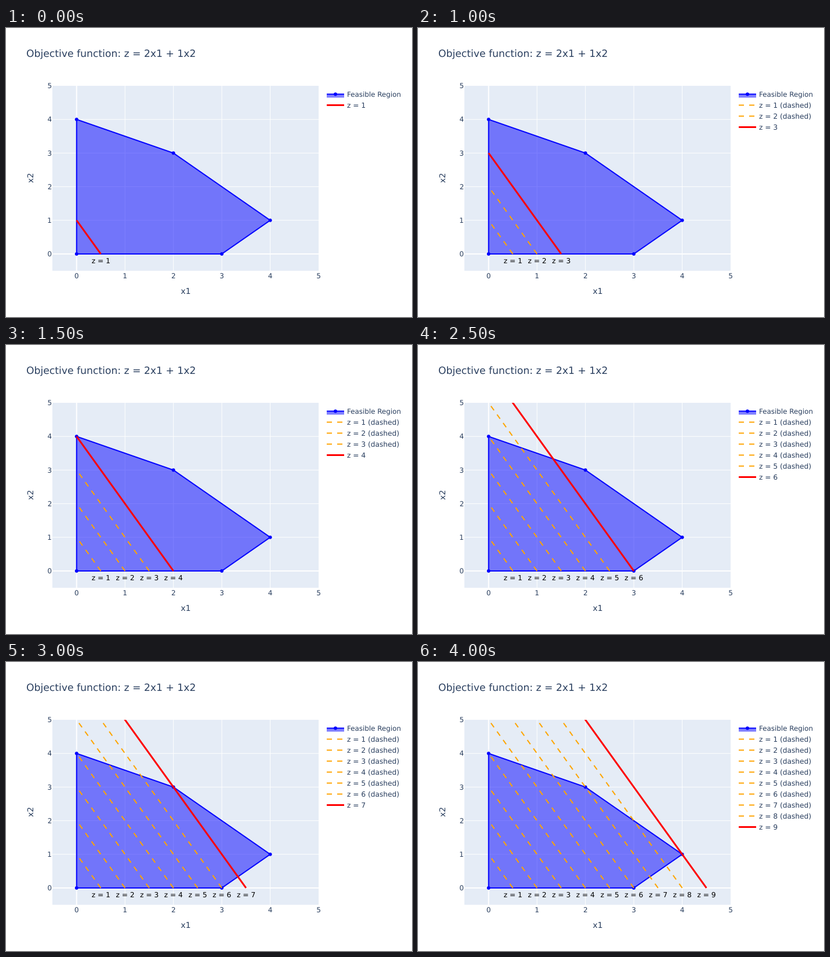
A matplotlib script that plays this animation: 700 by 500 pixels, repeating every 9.5 s.

```python
import matplotlib.pyplot as plt
from matplotlib.animation import FuncAnimation
from matplotlib.patches import Circle, PathPatch, Polygon, Rectangle
from matplotlib.textpath import TextPath
from matplotlib.transforms import Affine2D

W, H, DPI = 700, 500, 100
PX = 72 / DPI  # points per pixel
LEFT, RIGHT, TOP, BOTTOM = 80, 539, 100, 420
LOW, HIGH = -0.5, 5
INK, PANEL = "#2a3f5f", "#e5ecf6"
MAX_Z, FRAMES, STEP_MS = 9, 19, 500
CORNERS = [(0, 0), (0, 4), (2, 3), (4, 1), (3, 0)]

plt.rcParams["font.family"] = "DejaVu Sans"
fig = plt.figure(figsize=(W / DPI, H / DPI), dpi=DPI, facecolor="white")
ax = fig.add_axes([0, 0, 1, 1])
ax.set(xlim=(0, W), ylim=(H, 0))
ax.axis("off")


def px(x):
    return LEFT + (x - LOW) / (HIGH - LOW) * (RIGHT - LEFT)


def py(y):
    return BOTTOM - (y - LOW) / (HIGH - LOW) * (BOTTOM - TOP)


def legend_y(row):
    return 114.5 + 19 * row


def box(x, y, w, h, color, z):
    ax.add_patch(Rectangle((x, y), w, h, fc=color, lw=0, zorder=z, snap=False))


def label(x, y, text, size=12, color=INK, align=0, angle=0, z=8):
    """Text outline on a whole-pixel baseline; align 0 left, 0.5 centre, 1 right."""
    glyphs = TextPath((0, 0), text, size=size)
    ink = glyphs.get_extents()
    place = (Affine2D().translate(-align * (ink.x0 + ink.x1), 0).scale(1, -1)
             .rotate_deg(-angle).translate(x, round(y)))
    return ax.add_patch(PathPatch(glyphs.transformed(place), fc=color, lw=0,
                                  zorder=z, snap=False))


def stroke(xs, ys, color, width, z, **kw):
    line, = ax.plot(xs, ys, color=color, lw=width * PX, zorder=z, snap=False,
                    solid_capstyle="butt", dash_capstyle="butt", **kw)
    return line


def dot(x, y):
    ax.add_patch(Circle((x, y), 3, fc="blue", lw=0, zorder=4))


def draw_axes():
    box(LEFT, TOP, RIGHT - LEFT, BOTTOM - TOP, PANEL, 0)
    for v in range(5):
        width = 1 if v else 2
        stroke([px(v)] * 2, [TOP, BOTTOM], "white", width, 1)
        stroke([LEFT, RIGHT], [py(v)] * 2, "white", width, 1)
    for v in range(6):
        label(px(v), 433, str(v), align=0.5)
        label(79, py(v) + 4.2, str(v), align=1)
    label((LEFT + RIGHT) / 2, 460, "x1", 14, align=0.5)
    label(47, (TOP + BOTTOM) / 2, "x2", 14, align=0.5, angle=90)
    label(35, 50, "Objective function: z = 2x1 + 1x2", 17.2)


def draw_region():
    pts = [(px(x), py(y)) for x, y in CORNERS]
    ax.add_patch(Polygon(pts, fc=(0, 0, 1, 0.5), lw=0, zorder=2))
    ax.add_patch(Polygon(pts, fill=False, ec="blue", lw=2 * PX,
                         joinstyle="miter", snap=False, zorder=3))
    for p in pts:
        dot(*p)
    y = legend_y(0)
    box(553, y, 30, 6, (0, 0, 1, 0.5), 2)
    stroke([553, 583], [y, y], "blue", 2, 3)
    dot(568, y)
    label(588, y + 4.6, "Feasible Region", 11.9)


def level(z, active):
    """Objective line for one z value together with its legend entry."""
    if active:
        style = dict(color="red", width=3, z=6)
    else:
        style = dict(color="orange", width=2, z=5, linestyle=(0, (4.5, 4.5)))
    line = stroke([px(z / 2), px(0)], [py(0), py(z)], **style)
    line.set_clip_path(panel_clip)
    y = legend_y(z)
    key = stroke([553, 583], [y, y], **style)
    name = f"z = {z}" if active else f"z = {z} (dashed)"
    return [line, key, label(588, y + 4.6, name, 12.2)]


draw_axes()
draw_region()
panel_clip = Rectangle((LEFT, TOP), RIGHT - LEFT, BOTTOM - TOP,
                       transform=ax.transData)
levels = range(1, MAX_Z + 1)
solid = {z: level(z, True) for z in levels}
dashed = {z: level(z, False) for z in levels}
marks = {z: label(px(z / 2), 407, f"z = {z}", 12.2, "black", align=0.5)
         for z in levels}


def update(i):
    now = min(i + 1, MAX_Z)
    for z in levels:
        for artist in solid[z]:
            artist.set_visible(z == now)
        for artist in dashed[z]:
            artist.set_visible(z < now)
        marks[z].set_visible(z <= now)
    return []


anim = FuncAnimation(fig, update, frames=FRAMES, interval=STEP_MS,
                     init_func=lambda: update(0), repeat=True)
plt.show()
```
